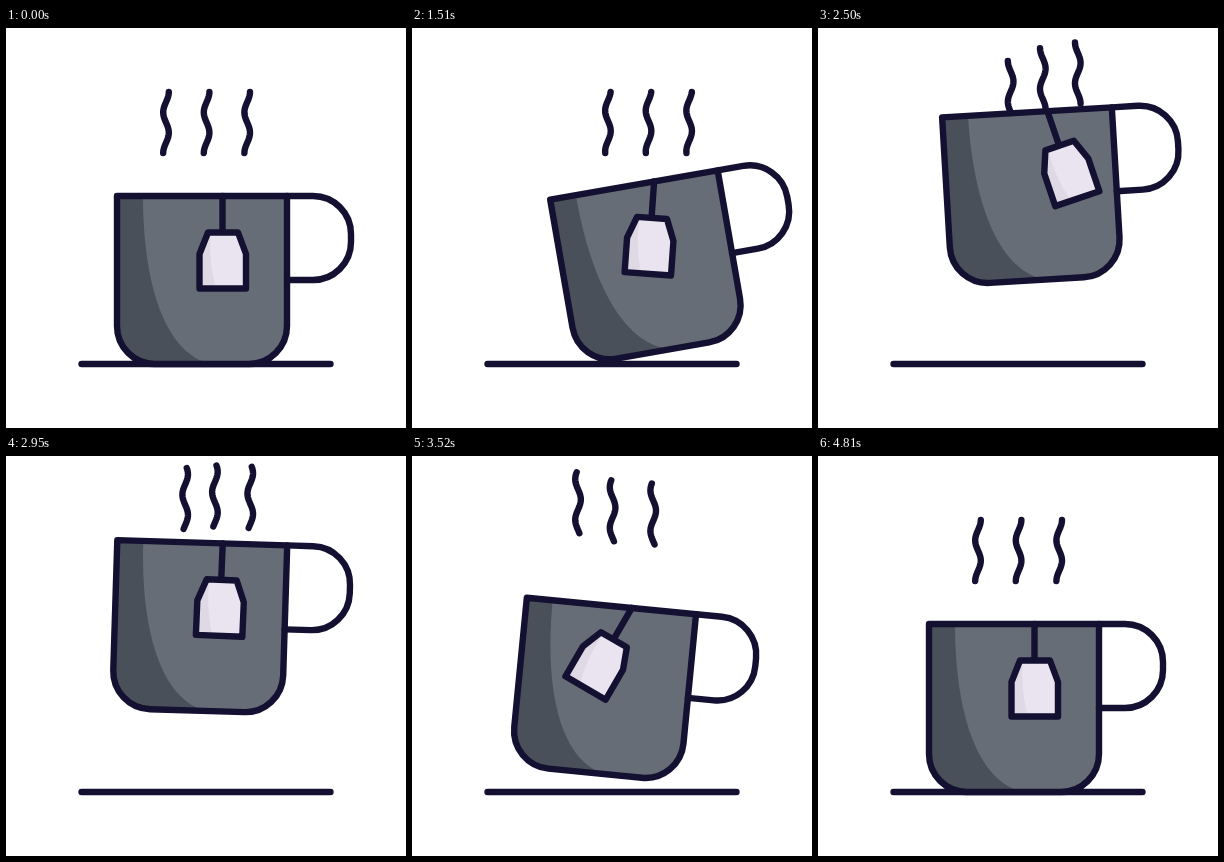
These frames come from a looping animation (400x400 px, 4840 ms). An HTML page with a canvas:

```html
<!DOCTYPE html>
<html lang="en">
<head>
<meta charset="utf-8">
<title>Cup of tea</title>
<style>
html, body { margin: 0; width: 100%; height: 100%; overflow: hidden; background: #fff; }
canvas { display: block; width: 100vmin; height: 100vmin; margin: auto; }
</style>
</head>
<body>
<canvas id="stage"></canvas>
<script>
const canvas = document.getElementById('stage');
const ctx = canvas.getContext('2d');
const LOOP = 4840, REST = 1030, STEP = 30;
const INK = '#131032', BODY = '#666d77', SHADE = '#495059', PAPER = '#e9e4ef', FOLD = '#dfd9e6';

// Smooth 0 to 1 between two times; power above 1 starts later, below 1 sooner.
function ramp(t, from, to, power = 1) {
  const u = Math.min(1, Math.max(0, (t - from) / (to - from))) ** power;
  return u * u * (3 - 2 * u);
}

// Eases from 0 at `start` through turning points [time, value, power].
function path(start, ...points) {
  return t => {
    let from = start, last = 0, sum = 0;
    for (const [time, value, power] of points) {
      sum += (value - last) * ramp(t, from, time, power);
      from = time;
      last = value;
    }
    return sum;
  };
}

const cup = {
  x: path(REST, [1750, 54.5], [3320, -8.5, 0.8], [3750, 0]),
  y: path(REST, [2690, -88, 1.17], [3740, -5, 1.25], [4000, 0]),
  turn: path(REST, [1540, -10], [2500, -3.4, 0.8], [3450, 6.1, 0.85], [3830, 0])
};
const swing = path(REST, [1480, 14], [2420, -15.5, 1.15], [3470, 26, 1.25], [3900, -10], [4300, 3], [4820, 0]);
const ripple = path(REST, [4780, 4 * Math.PI, 1.2]);

// Each wisp follows the cup; a larger lag rises later and drifts back slower.
const steam = [1, 0.3, 0].map((lag, i) => ({
  left: 160 + 40.6 * i,
  x: path(REST, [1780, 51], [3230 + 950 * lag, 0, 0.75]),
  y: path(1600 + 130 * lag, [2720 + 430 * lag, -55], [4780, 0])
}));

const stagePath = new Path2D('M0 0H400V400H0Z');
const bodyPath = new Path2D('M111 168H281V298A38 38 0 0 1 243 336H149A38 38 0 0 1 111 298Z');
const shadePath = new Path2D('M111 168H137C137 258 160 327 206 336H149A38 38 0 0 1 111 298Z');
const handlePath = new Path2D('M281 168H307A38 38 0 0 1 345 206V214A38 38 0 0 1 307 252H281');
const stringPath = new Path2D('M216.5 168V204');
const tagPath = new Path2D('M202 204.5H232L240 226V260.5H193.5V226Z');
const foldPath = new Path2D('M202 204.5H205C203 222 205 242 210 260.5H193.5V226Z');
const groundPath = new Path2D('M75.5 336H324.5');

function fill(shape, color) {
  ctx.fillStyle = color;
  ctx.fill(shape);
}

function rotateAt(x, y, degrees) {
  ctx.translate(x, y);
  ctx.rotate(degrees * Math.PI / 180);
  ctx.translate(-x, -y);
}

function drawSteam(t) {
  const phase = ripple(t), height = 61;
  for (const wisp of steam) {
    const x = wisp.left + wisp.x(t), y = 64 + wisp.y(t);
    ctx.beginPath();
    for (let s = 0; s <= height; s++) {
      ctx.lineTo(x + 2.8 * Math.cos(s / height * 3 * Math.PI + phase), y + s);
    }
    ctx.stroke();
  }
}

function drawTag(t) {
  rotateAt(216.5, 168, swing(t));
  ctx.stroke(stringPath);
  fill(tagPath, PAPER);
  fill(foldPath, FOLD);
  ctx.stroke(tagPath);
}

function drawCup(t) {
  ctx.save();
  ctx.translate(cup.x(t), cup.y(t));
  rotateAt(196, 252, cup.turn(t));
  fill(bodyPath, BODY);
  fill(shadePath, SHADE);
  ctx.stroke(handlePath);
  ctx.stroke(bodyPath);
  drawTag(t);
  ctx.restore();
}

function draw(t) {
  const scale = canvas.width / 400;
  ctx.setTransform(scale, 0, 0, scale, 0, 0);
  fill(stagePath, '#fff');
  ctx.strokeStyle = INK;
  ctx.lineWidth = 6.4;
  ctx.lineCap = ctx.lineJoin = 'round';
  ctx.stroke(groundPath);
  drawSteam(t);
  drawCup(t);
}

const start = performance.now();

function tick() {
  const t = (performance.now() - start) % LOOP;
  draw(t < REST ? 0 : REST + Math.floor((t - REST) / STEP) * STEP);
  requestAnimationFrame(tick);
}

function resize() {
  const side = Math.min(innerWidth, innerHeight) || 400;
  canvas.width = canvas.height = Math.round(side * (devicePixelRatio || 1));
}

addEventListener('resize', resize);
resize();
tick();
</script>
</body>
</html>
```
